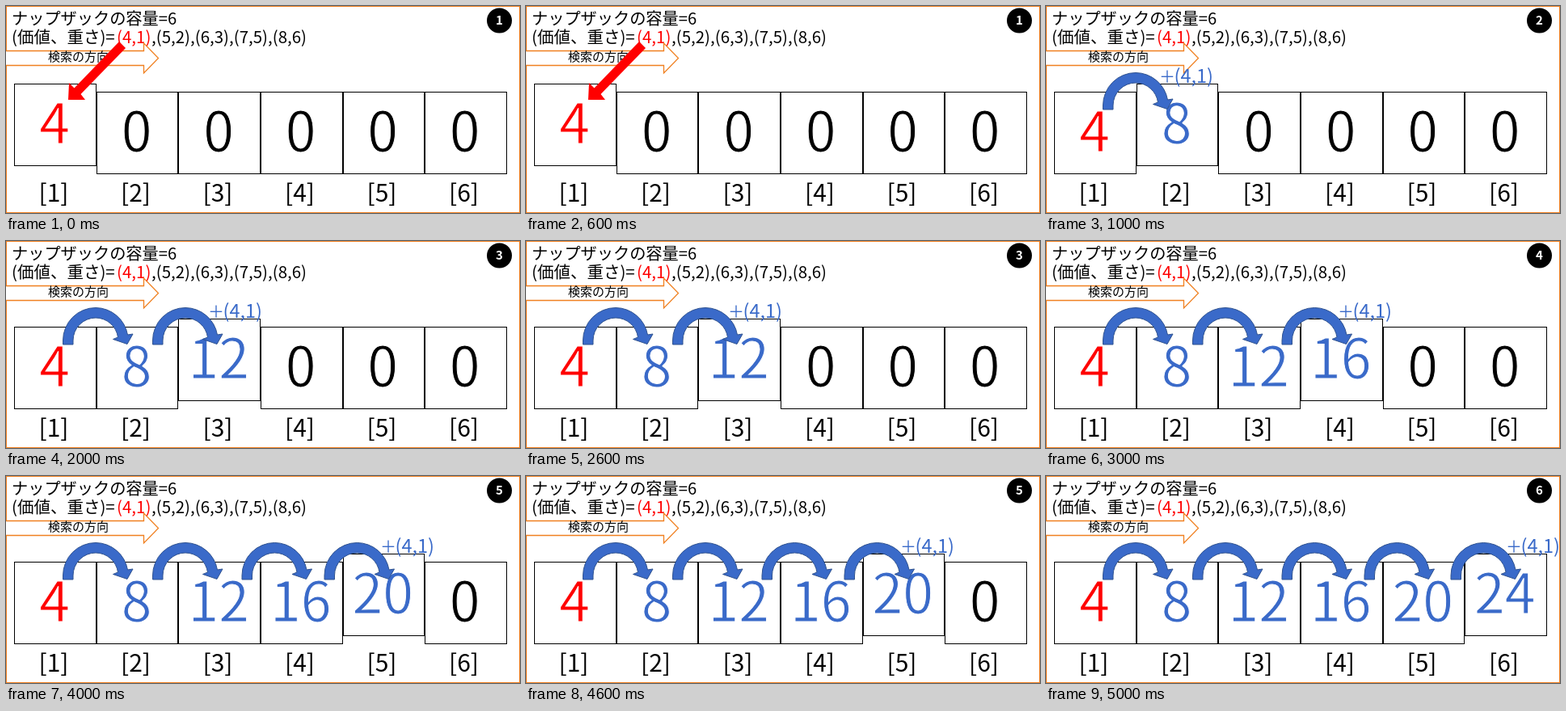
An HTML page that plays this animation: 636x256 px, repeating every 6 s.

```html
<!DOCTYPE html>
<html lang="ja">
<head>
<meta charset="utf-8">
<title>ナップザック</title>
<style>
  html, body { margin: 0; width: 100%; height: 100%; overflow: hidden; background: #fff; }
  svg { display: block; font-family: "Noto Sans CJK JP", "Noto Sans CJK", "Noto Sans", sans-serif; }
  .red { fill: #f00; }
  .blue { fill: #3a6ac9; }
  .outline { fill: #fff; stroke: #f08020; }
  /* The white stroke thins the large digits. */
  .value { font-size: 68px; font-weight: 300; text-anchor: middle; stroke: #fff; }
  .label { font-size: 30px; text-anchor: middle; }
  .plus { font-size: 23.5px; font-weight: 300; }
  .cell { fill: #fff; stroke: #000; shape-rendering: crispEdges; }
  .hop { stroke: #2f528f; }
</style>
</head>
<body>
<svg width="636" height="256" viewBox="0 0 636 256">
  <rect class="outline" x=".5" y=".5" width="635" height="255"/>
  <text x="7" y="23" font-size="20.2">ナップザックの容量=6</text>
  <text y="46" font-size="20.5"><tspan x="7">(価値、重さ)=</tspan><tspan x="137" class="red">(4,1)</tspan><tspan x="180">,(5,2),(6,3),(7,5),(8,6)</tspan></text>
  <path class="outline" d="M0 55.5H170.5V46L188.5 64.5L170.5 83V73.5H0" stroke-width="1.3"/>
  <text x="52" y="68" font-size="15">検索の方向</text>
  <circle cx="610.5" cy="18" r="15.5"/>
  <text id="badge" x="610.5" y="23" font-size="15" font-weight="700" fill="#fff" text-anchor="middle"></text>
  <g id="cells"></g>
  <g id="hops"></g>
  <path id="pointer" class="red" d="M140 44L148 52L92.5 109L98 116L77 116L78 95L84.5 101.5Z"/>
  <g id="plus" class="plus blue"><text x="-2" y="95" font-size="20" style="font-size:20px">＋</text><text x="16.5" y="95">(4,1)</text></g>
</svg>
<script>
const COUNT = 6, STEP_MS = 1000, ITEM_VALUE = 4;
const HOP_X = [70, 181, 291.5, 393.5, 500.5];
const PLUS_X = [142, 252, 363, 465, 571];
const HOP_PATH = 'M.5 46V41A40.5 40.5 0 0 1 41 .5A40.5 40.5 0 0 1 80.5 34L87 33L80 45.5L62.5 39.5L68.5 37A28 28 0 0 0 41 13A28 28 0 0 0 13 41V46Z';
const byId = id => document.getElementById(id);

function add(parent, tag, attrs, text = '') {
  const node = document.createElementNS('http://www.w3.org/2000/svg', tag);
  for (const key in attrs) node.setAttribute(key, attrs[key]);
  node.textContent = text;
  return parent.appendChild(node);
}

const cellX = i => Math.round(10 + 101.65 * i);

const cells = Array.from({ length: COUNT }, (_, i) => {
  const x = cellX(i);
  const group = add(byId('cells'), 'g', {});
  add(group, 'rect', { class: 'cell', x: x + 0.5, y: 106.5, width: cellX(i + 1) - x - 1, height: 101 });
  const value = add(group, 'text', { x: 60.2 + 101.5 * i, y: 180 });
  add(byId('cells'), 'text', { class: 'label', x: 59 + 101.5 * i, y: 242 }, `[${i + 1}]`);
  return { group, value };
});

const hops = HOP_X.map(x =>
  add(byId('hops'), 'path', { class: 'hop blue', d: HOP_PATH, transform: `translate(${x} 82)` }));

const show = (node, visible) => node.setAttribute('visibility', visible ? 'visible' : 'hidden');

function render(step) {
  byId('badge').textContent = step + 1;
  cells.forEach(({ group, value }, i) => {
    const filled = i <= step;
    group.setAttribute('transform', `translate(0 ${i === step ? -10 : 0})`);
    value.textContent = filled ? ITEM_VALUE * (i + 1) : 0;
    value.setAttribute('class', 'value ' + (!filled ? '' : i ? 'blue' : 'red'));
  });
  hops.forEach((hop, i) => show(hop, i < step));
  show(byId('pointer'), step === 0);
  show(byId('plus'), step > 0);
  if (step) byId('plus').setAttribute('transform', `translate(${PLUS_X[step - 1]} 0)`);
}

let current = -1;
function tick() {
  const step = Math.floor(performance.now() / STEP_MS) % COUNT;
  if (step !== current) render(current = step);
  requestAnimationFrame(tick);
}
tick();
</script>
</body>
</html>
```
